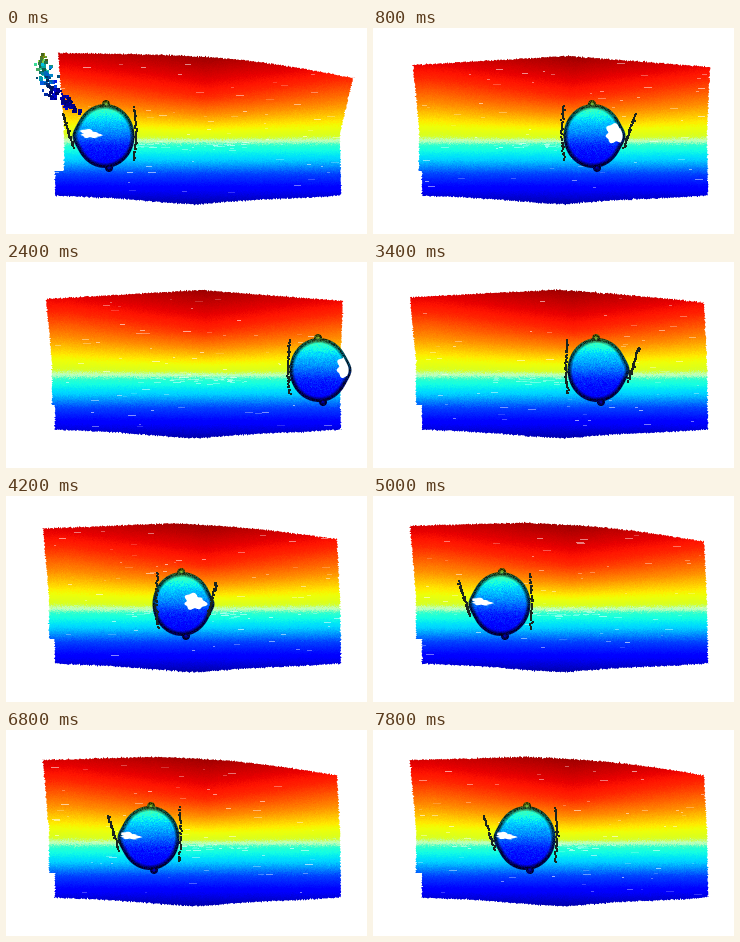
Write a matplotlib script that moves like this. It is 361 px wide and 206 px high and loops after 8 s.

```python
import numpy as np
import matplotlib
import matplotlib.pyplot as plt
from matplotlib.animation import FuncAnimation

W, H, FRAMES, STEP = 361, 206, 40, 200
jet = matplotlib.colormaps["jet"]
X, Y = np.meshgrid(np.arange(W) + 0.5, np.arange(H) + 0.5)
xs, ys = X[0], Y[:, 0]

# Key poses: head position, where its hole faces, turn of the scene
KEYS = [0, 4, 12, 17, 25, 29, 39]
HEAD_X = [99, 220, 313, 224, 128, 135, 153]
FACE = [-15, 23, 28, 45, -20, -20, -21]
TURN = [1, 0, 0, 0.15, 0.6, 0.6, 0.58]
HEAD_Y, RX, RY = 108, 29.5, 32


def over(img, color, alpha):
    a = np.clip(alpha, 0, 1)[..., None]
    return img * (1 - a) + color * a


def draw_sheet(img, turn, lap, rng):
    lead = turn * (1 - lap)
    lx, ly = 40 + 12 * lead - 3 * lap, 37 - 12 * turn
    rx, ry = 337 + 10 * lead - 6 * lap, 39 + 11 * turn
    peak = 195 - 72 * turn

    top = np.interp(xs, [lx, peak, rx], [ly, 28 - 2 * turn, ry])
    top -= 6 * turn * np.sin(np.pi * np.clip((xs - peak) / (rx - peak), 0, 1))
    bottom = np.interp(xs, [45, 192, 336], [167, 176, 167])
    bottom += np.sin(xs / 22) * 0.5
    left = np.interp(ys, [ly, 100], [lx, lx + 6])
    left[ys > 143] = 49
    right = np.interp(ys, [ry, 105, 168], [rx, 334, 335])
    top, bottom = (e + rng.normal(0, 0.35, W) for e in (top, bottom))
    left, right = (e[:, None] + rng.normal(0, 0.35, (H, 1)) for e in (left, right))
    mask = np.minimum(np.minimum(Y - top, bottom - Y),
                      np.minimum(X - left, right - X)) + 0.5

    # the middle bulges, so the warm bands hang lower there
    bulge = np.clip(1 - np.abs(X - 200) / 140, 0, 1)
    level = Y - 18 * bulge * np.clip((115 - Y) / 45, 0, 1)
    level = level + rng.normal(0, 0.8, (H, W))
    v = np.interp(level, [8, 50, 75, 95, 108, 117, 132, 146, 176],
                  [.98, .87, .76, .65, .61, .40, .33, .19, .04])
    color = jet(v)[..., :3]
    color = over(color, 1.0, 0.5 * np.exp(-((level - 112.5) / 3) ** 2))

    # gaps between scan lines, densest in the pale middle band
    gaps = np.zeros((H, W))
    for n in range(110):
        if n < 45:
            x, y = rng.integers(120, 240), int(rng.normal(118, 2))
        else:
            x, y = rng.integers(45, 330), rng.integers(35, 165)
        gaps[y, x:x + rng.integers(2, 9)] = rng.uniform(0.15, 0.6)
    return over(img, over(color, 1.0, gaps), mask)


def draw_head(img, cx, face, side, rng):
    dx, dy = X - cx, Y - HEAD_Y
    ang = np.arctan2(dy, side * dx)
    d = np.hypot(dx / RX, dy / RY) / (1 + 0.1 * np.exp(-(ang / 0.3) ** 2))
    for kx, ky in ((-side, -RY), (4, RY)):
        d = np.minimum(d, 0.85 + 0.15 * np.hypot(dx - kx, dy - ky) / 4)
    v = np.interp(dy / RY, [-1.1, -.85, -.5, -.1, .3, 1],
                  [.64, .42, .34, .26, .16, .1])
    v = v + rng.normal(0, 0.015, (H, W))
    rim = np.clip((d - 0.83) / 0.1, 0, 1) * rng.uniform(0.55, 0.9, (H, W))
    img = over(img, jet(v)[..., :3] * (1 - rim[..., None]), (1 - d) * RX + 0.5)

    # ragged hole, taller when it faces right
    hx, hy, hrx, hry = dx - face, dy + 2, 11, 6.5 + 0.13 * face
    ang = np.arctan2(hy / hry, hx / hrx)
    ragged = 1 + 0.14 * np.sin(3 * ang + 1) + 0.1 * np.sin(7 * ang)
    hole = (ragged - np.hypot(hx / hrx, (hy - 0.15 * hx) / hry)) * hry
    return over(img, 1.0, np.minimum(hole, (0.93 - d) * RX))


def arm_dots(cx, side, rng):
    """A slanted arm beside the hole and an upright one opposite."""
    t = np.linspace(0, 1, 45)
    near = np.column_stack([side * (42 - 11 * t), -22 + 34 * t])
    far = np.column_stack([-side * (29 + 2 * np.sin(np.pi * t)), -30 + 54 * t])
    dots = np.vstack([near, far]) + rng.normal(0, 0.6, (90, 2)) + [cx, HEAD_Y]
    return dots[dots[:, 0] < 340]


fig = plt.figure(figsize=(W / 100, H / 100), dpi=100, facecolor="white")
ax = fig.add_axes([0, 0, 1, 1])
ax.axis("off")
picture = ax.imshow(np.ones((H, W, 3)), extent=(0, W, H, 0),
                    interpolation="nearest", aspect="auto")
ax.set(xlim=(0, W), ylim=(H, 0))
arms = ax.scatter([], [], s=4.5, c="#1a2420", marker="s", linewidths=0)

# loose points flying off at the start
seed = np.random.default_rng(5)
t = np.sort(seed.random(130))
path = np.column_stack([36 + 36 * t ** 2.2, 27 + 57 * t])
spread = (1.5 + 3 * np.sin(np.pi * t))[:, None]
spray_xy = path + seed.normal(0, 1, (130, 2)) * spread
spray_rgb = jet(0.08 + 0.55 * (1 - t) ** 2)[:, :3]
spray_rgb = spray_rgb * seed.uniform(0.35, 0.95, (130, 1))
spray = ax.scatter(*spray_xy.T, s=seed.uniform(2, 8, 130), c=spray_rgb,
                   marker="s", linewidths=0)


def update(i):
    rng = np.random.default_rng(100 + i)
    cx, face, turn = (np.interp(i, KEYS, k) for k in (HEAD_X, FACE, TURN))
    lap = np.clip((i - 12) / 5, 0, 1)
    side = np.clip(face / 15, -1, 1)
    img = draw_sheet(np.ones((H, W, 3)), turn, lap, rng)
    picture.set_data(np.clip(draw_head(img, cx, face, side, rng), 0, 1))
    arms.set_offsets(arm_dots(cx, side, rng))
    spray.set_offsets(spray_xy + [-4 * i, -12 * i])
    spray.set_visible(i < 3)
    return picture, arms, spray


anim = FuncAnimation(fig, update, frames=FRAMES, interval=STEP,
                     repeat=True, repeat_delay=0, blit=False)
plt.show()
```
